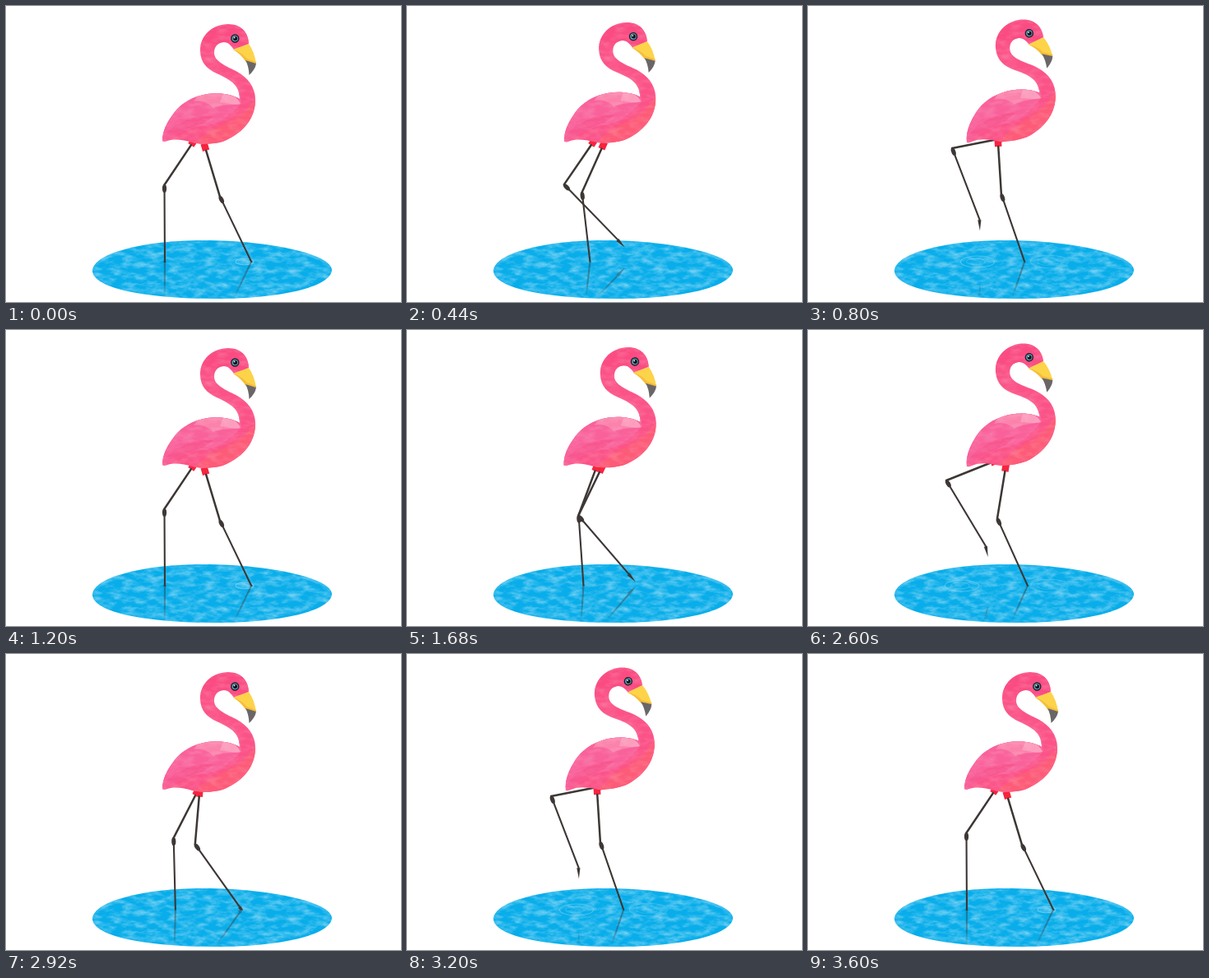
These frames come from a looping animation (480 by 360 pixels, 3640 ms). An HTML page:

```html
<!DOCTYPE html>
<html lang="en">
<head>
<meta charset="utf-8">
<title>Walking flamingo</title>
<style>
  html, body { margin: 0; width: 100%; height: 100%; overflow: hidden; background: #fff; }
  svg { display: block; width: 100vw; height: 100vh; }
  .leg { fill: none; stroke: #3d3735; stroke-linecap: round; stroke-linejoin: round; }
  .knob { fill: #3d3735; }
  .sleeve { stroke: #f6243f; stroke-width: 8.5; }
  .ring { fill: none; stroke: #8fd8f4; stroke-width: 1.1; }
</style>
</head>
<body>
<svg viewBox="0 0 480 360">
  <defs>
    <path id="pondShape" d="M105 322 C106 301 166 285 240 285 C322 285 395 302 396 321 C395 342 332 356 256 356 C172 356 106 344 105 322Z"/>
    <path id="birdShape" d="M295 46 C295 33 286 22 270 22 C251 22 236 36 236 54 C236 69 245 77 256 82 C271 89 284 95 284 113
      C274 107 255 104 238 108.500 C222 112 209 122 202 133 C196 141 190 152 190 164 Q192 165.500 196 164 C206 161 216 163 226 166
      C238 169 252 168 263 165 C284 157 303 140 303 114 C303 98 293 87 281 80
      C270 74 253 68 253 57 C253 48 259 44 265 44 C271 44 274 49 277 53Z"/>
    <clipPath id="pondClip"><use href="#pondShape"/></clipPath>
    <clipPath id="birdClip"><use href="#birdShape"/></clipPath>
    <clipPath id="airClip"><rect width="480" height="311.500"/></clipPath>
    <linearGradient id="fade" gradientUnits="userSpaceOnUse" x1="0" y1="311" x2="0" y2="355">
      <stop offset="0" stop-color="#fff"/>
      <stop offset=".6" stop-color="#ccc"/>
      <stop offset="1" stop-color="#000"/>
    </linearGradient>
    <mask id="depth" maskUnits="userSpaceOnUse" x="0" y="280" width="480" height="80">
      <rect y="280" width="480" height="80" fill="url(#fade)"/>
    </mask>
    <filter id="wash" x="0" y="0" width="1" height="1" color-interpolation-filters="sRGB">
      <feTurbulence type="fractalNoise" baseFrequency=".07 .16" numOctaves="4" seed="7"/>
      <feColorMatrix values="0 0 0 0 1  0 0 0 0 1  0 0 0 0 1  .9 0 0 0 -.35"/>
    </filter>
  </defs>

  <use href="#pondShape" fill="#08adea"/>
  <g clip-path="url(#pondClip)">
    <rect x="100" y="280" width="300" height="80" filter="url(#wash)"/>
    <g id="rings"></g>
    <g mask="url(#depth)"><g id="mirror" opacity=".45"></g></g>
  </g>
  <g id="legs" clip-path="url(#airClip)"></g>

  <g id="bird">
    <use href="#birdShape" fill="#fb5388"/>
    <g clip-path="url(#birdClip)">
      <path d="M303 112 C292 132 270 142 250 150 L222 172 L270 172 L310 140Z" fill="#fd5b78"/>
      <path d="M186 168 L186 140 L220 104 L284 104 L286 119 C272 131 262 142 244 145 C224 148 206 153 194 165Z" fill="#f9619a"/>
      <path d="M190 160 C202 144 226 132 252 134 C242 146 214 148 196 162Z" fill="#f8568f"/>
      <path d="M236 106 C250 104 272 104 285 119 C274 121 262 119 252 124 C246 118 238 114 228 116Z" fill="#fb82ab"/>
      <path d="M264 107 C274 106 281 111 285 119 C277 121 268 118 260 117Z" fill="#fc9cbc"/>
      <path d="M230 30 L300 20 L300 52 L268 48 Q250 42 230 50Z" fill="#f94982" opacity=".7"/>
      <rect x="185" y="15" width="125" height="160" filter="url(#wash)" opacity=".4"/>
    </g>
    <path d="M276 53 L295 46 Q302 56 304 70 L291 67 Q285 58 276 53Z" fill="#fdd34a"/>
    <path d="M276 53 Q286 56 293 64 L304 68 L304 70 L291 67 Q285 58 276 53Z" fill="#f6bd3a"/>
    <path d="M291 66 L304 70 Q303 77 295.500 84 Q295 73 291 66Z" fill="#6a6667"/>
    <circle cx="278.300" cy="39.500" r="5.200" fill="#16222c"/>
    <circle cx="278.300" cy="39.500" r="3.800" fill="#5f9cb2"/>
    <circle cx="278.600" cy="39.500" r="2.500" fill="#0d1116"/>
    <circle cx="277.600" cy="38.400" r=".9" fill="#fff"/>
  </g>
</svg>
<script>
const LOOP = 3640, CYCLE = 1200, HALF = 600, STEP = 40;
const THIGH = 62, SHANK = 93.5, TOE = 13, WATER = 311;

// Pose keys: time, hip x, hip y, thigh angle, shank angle (degrees forward of vertical)
const POSES = [
  [
    [0, 242, 172, 16.7, 25.7],
    [200, 240, 168, -9.3, 24.3],
    [440, 238, 170, -24.1, 6.6],
    [600, 227, 166, -33.8, .3],
    [800, 236, 161, -78.9, 21],
    [960, 236, 164, -64.9, 31.4],
    [1040, 231, 166, -38, 43]
  ],
  [
    [0, 227, 166, -33.8, .3],
    [200, 225.6, 160, -68.2, 31],
    [360, 226, 164, -57, 37],
    [440, 226, 166, -34.5, 44.2],
    [600, 242, 172, 16.7, 25.7],
    [800, 231, 167, 3.6, 19],
    [960, 229, 165, -18.7, 9.9]
  ]
];

const $ = id => document.getElementById(id);
const clamp = v => Math.max(0, Math.min(1, v));

function make(parent, tag, cls) {
  const el = document.createElementNS('http://www.w3.org/2000/svg', tag);
  if (cls) el.setAttribute('class', cls);
  parent.appendChild(el);
  return el;
}

function set(el, attrs) {
  for (const k in attrs) el.setAttribute(k, attrs[k]);
}

// Smooth periodic interpolation through the keys
function sample(keys, t) {
  const n = keys.length;
  const key = (i, c) => {
    const turn = Math.floor(i / n);
    return keys[i - turn * n][c] + (c ? 0 : turn * CYCLE);
  };
  let i = n - 1;
  while (key(i, 0) > t) i--;
  const t1 = key(i, 0), d = key(i + 1, 0) - t1, s = (t - t1) / d;
  const slope = (j, c) => (key(j + 1, c) - key(j - 1, c)) / (key(j + 1, 0) - key(j - 1, 0)) * d;
  return [1, 2, 3, 4].map(c => {
    const a = key(i, c), b = key(i + 1, c), ma = slope(i, c), mb = slope(i + 1, c);
    const k = 3 * (b - a) - 2 * ma - mb, l = 2 * (a - b) + ma + mb;
    return a + s * (ma + s * (k + s * l));
  });
}

function ahead([x, y], deg, len) {
  const r = deg * Math.PI / 180;
  return [x + Math.sin(r) * len, y + Math.cos(r) * len];
}

function makeLeg(parent) {
  const g = make(parent, 'g');
  const clipped = make(g, 'g');
  clipped.setAttribute('clip-path', 'url(#airClip)');
  const part = {
    g,
    sleeve: make(clipped, 'path', 'sleeve'),
    thigh: make(clipped, 'path', 'leg'),
    shank: make(clipped, 'path', 'leg'),
    toe: make(clipped, 'path', 'knob'),
    knob: make(clipped, 'ellipse', 'knob')
  };
  set(part.thigh, { 'stroke-width': 2.5 });
  set(part.shank, { 'stroke-width': 2.1 });
  set(part.knob, { rx: 2.6, ry: 5 });
  return part;
}

const line = (a, b) => `M${a}L${b}`;

function drawLeg(part, hip, thigh, shank) {
  const knee = ahead(hip, thigh, THIGH);
  const ankle = ahead(knee, shank, SHANK);
  const bend = shank - 20 * clamp((286 - ankle[1]) / 20);
  const toe = ahead(ankle, bend, TOE);
  const knob = ahead(knee, shank, 4.5);
  const cuff = ahead(hip, thigh, 4);
  set(part.thigh, { d: line(cuff, knee) });
  set(part.shank, { d: line(knee, ankle) });
  set(part.toe, {
    d: `M${ahead(ankle, bend - 90, 2.4)}L${ahead(ankle, bend + 90, 1.8)}L${toe}Z`
  });
  set(part.knob, { cx: knob[0], cy: knob[1], transform: `rotate(${-shank} ${knob})` });
  set(part.sleeve, { d: line(ahead(hip, thigh, -5), cuff) });
  return toe[1];
}

const legs = POSES.map(() => makeLeg($('legs')));
const mirrors = POSES.map(() => makeLeg($('mirror')));
const rings = [0, 1, 2, 3].map(() => make($('rings'), 'ellipse', 'ring'));

function drawRing(i, x, rx, alpha) {
  [1, .55].forEach((k, j) => set(rings[i * 2 + j], {
    cx: x - j * 2, cy: WATER, rx: rx * k, ry: rx * k * .34, opacity: alpha * (1 - j * .3)
  }));
}

function draw(ms) {
  const time = Math.floor((ms % LOOP) / STEP) * STEP;
  const t = time % CYCLE, odd = t >= HALF, u = t % HALF / HALF;

  const bob = (1 - Math.cos(2 * Math.PI * (u + .065))) / 2;
  set($('bird'), { transform: `rotate(${-6.4 * (bob - .04)} 208 135)` });

  POSES.forEach((keys, i) => {
    const [x, y, thigh, shank] = sample(keys, t);
    const toeY = drawLeg(legs[i], [x, y], thigh, shank);
    drawLeg(mirrors[i], [x, y], thigh, shank);
    const axis = WATER - 5 * clamp((WATER - toeY) / 12);
    set(mirrors[i].g, { transform: `matrix(1 0 0 -1 0 ${2 * axis})` });
  });

  drawRing(0, 290 + 10 * u, 11 + 36 * u, .65 * clamp(1 - u / .58));
  const v = u - .08;
  drawRing(1, odd ? 206 : 187, 8 + 50 * Math.max(0, v), v > 0 ? .95 * clamp(1 - v / .48) : 0);
}

const start = performance.now();
function tick() {
  draw(performance.now() - start);
  requestAnimationFrame(tick);
}
draw(0);
requestAnimationFrame(tick);
</script>
</body>
</html>
```
